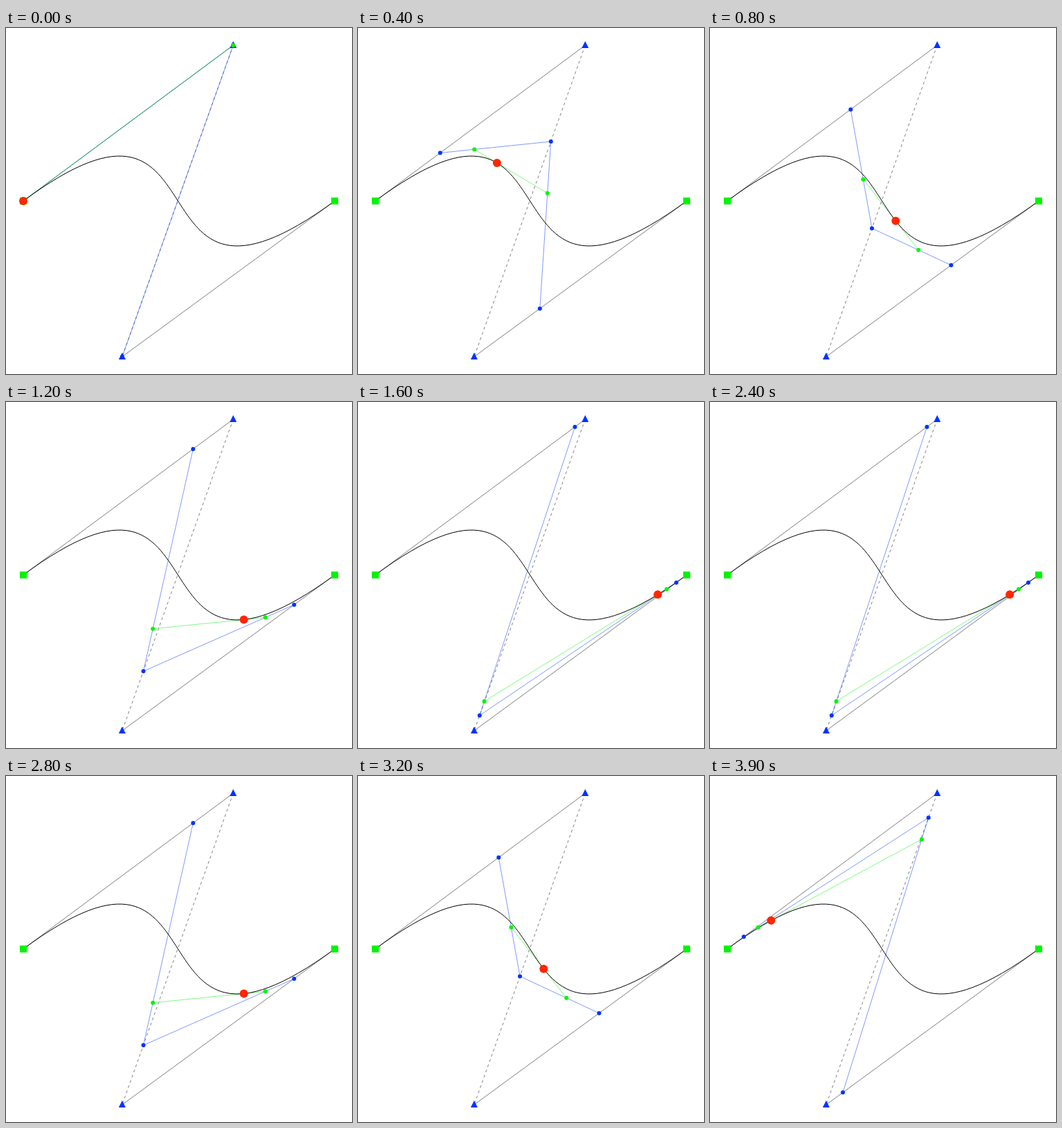
An HTML page with a canvas that plays this animation: 500x500 px, repeating every 4000 ms.

```html
<!DOCTYPE html>
<html>
<head>
<meta charset="utf-8">
<style>
html, body { margin: 0; width: 100%; height: 100%; overflow: hidden; background: #fff; }
canvas { display: block; }
</style>
</head>
<body>
<canvas id="stage" width="500" height="500"></canvas>
<script>
const ctx = document.getElementById('stage').getContext('2d');
const PERIOD = 4000, STEP = 100;
const BLUE = '#0033ff', GREEN = '#00f500', RED = '#ff2600';
const control = [[25, 250], [328.3, 25], [167.9, 475], [475, 250]];
const [start, handleA, handleB, end] = control;

const mix = (a, b, u) => a.map((v, i) => v + (b[i] - v) * u);
const reduce = (points, u) => points.slice(1).map((p, i) => mix(points[i], p, u));

function line(a, b, color, dash = []) {
  ctx.globalAlpha = 0.5;
  ctx.strokeStyle = color;
  ctx.setLineDash(dash);
  ctx.beginPath();
  ctx.moveTo(...a);
  ctx.lineTo(...b);
  ctx.stroke();
  ctx.setLineDash([]);
  ctx.globalAlpha = 1;
}

function dot([x, y], radius, color) {
  ctx.fillStyle = color;
  ctx.beginPath();
  ctx.arc(x, y, radius, 0, Math.PI * 2);
  ctx.fill();
}

function square([x, y]) {
  ctx.fillStyle = GREEN;
  ctx.fillRect(x - 5, y - 5, 10, 10);
}

function triangle([x, y]) {
  ctx.fillStyle = BLUE;
  ctx.beginPath();
  ctx.moveTo(x, y - 6);
  ctx.lineTo(x + 5, y + 4);
  ctx.lineTo(x - 5, y + 4);
  ctx.fill();
}

function curve() {
  ctx.strokeStyle = '#000';
  ctx.beginPath();
  ctx.moveTo(...start);
  ctx.bezierCurveTo(...handleA, ...handleB, ...end);
  ctx.stroke();
}

function draw(time) {
  const u = Math.sin(Math.PI * time / PERIOD);
  const outer = reduce(control, u);
  const inner = reduce(outer, u);
  const [point] = reduce(inner, u);

  ctx.fillStyle = '#fff';
  ctx.fillRect(0, 0, 500, 500);
  ctx.lineWidth = 1;

  line(start, handleA, '#000');
  line(handleA, handleB, '#000', [4, 4]);
  line(handleB, end, '#000');
  line(outer[0], outer[1], BLUE);
  line(outer[1], outer[2], BLUE);
  line(inner[0], inner[1], GREEN);
  curve();

  [start, end].forEach(square);
  [handleA, handleB].forEach(triangle);
  outer.forEach(p => dot(p, 3, BLUE));
  inner.forEach(p => dot(p, 3, GREEN));
  dot(point, 6, RED);
}

const origin = performance.now();
function tick() {
  const elapsed = (performance.now() - origin) % PERIOD;
  draw(Math.floor(elapsed / STEP) * STEP);
  requestAnimationFrame(tick);
}
tick();
</script>
</body>
</html>
```
